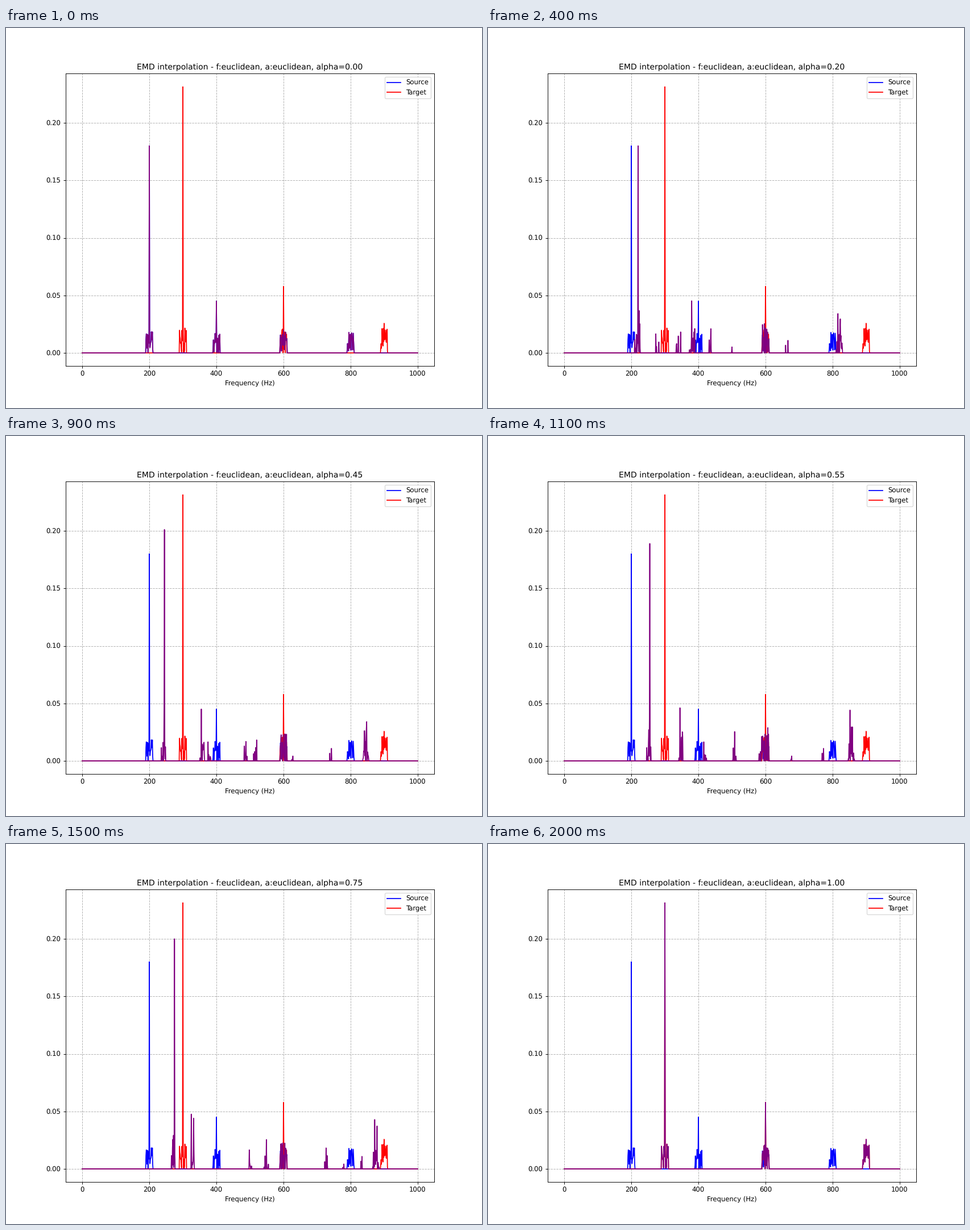
A matplotlib script for the animation above (2.1 s loop, 837x669 px).

```python
import matplotlib.pyplot as plt
import numpy as np
from matplotlib.animation import FuncAnimation

W, H, DPI = 837, 669, 83.7
STEPS = 20
N = 1001          # one bin per Hz
SPREAD = 10       # noise reaches this far around each harmonic
EPS = 1e-9

rng = np.random.default_rng(7)


def spectrum(base, count, peak):
    """Harmonics falling as 1/k^2 in narrow bands of noise, total mass 1."""
    spikes = 10 / np.arange(1, count + 1) ** 2
    bands = rng.random((count, 2 * SPREAD + 1))
    bands[:, SPREAD] = 0
    bands *= (10 / peak - spikes.sum()) / bands.sum()
    bands[:, SPREAD] = spikes
    y = np.zeros(N)
    for k, band in enumerate(bands, 1):
        y[k * base - SPREAD:k * base + SPREAD + 1] = band
    return y / y.sum()


def transport(start, end):
    """Send each bin to the cheapest open bin: (from, to, mass) parcels."""
    room = end.copy()
    bins = rng.permutation(np.flatnonzero(start))
    # Spikes choose first, the noise follows in random order.
    bins = bins[np.argsort(-np.maximum(start[bins], 0.03), kind="stable")]
    plan = []
    for i in bins:
        left = start[i]
        while left > EPS:
            free = np.flatnonzero(room > EPS)
            if not free.size:
                break
            cost = abs(free - i) + 1000 * abs(room[free] - left)
            j = free[cost.argmin()]
            m = min(left, room[j])
            left -= m
            room[j] -= m
            plan.append((i, j, m))
    return np.array(plan).T


freq = np.arange(N)
first = spectrum(200, 4, 0.18)
last = spectrum(300, 3, 0.2313)
src, dst, mass = transport(first, last)


def blend(alpha):
    pos = np.rint(src + alpha * (dst - src)).astype(int)
    return np.bincount(pos, weights=mass, minlength=N)


def heading(alpha):
    return f"EMD interpolation - f:euclidean, a:euclidean, alpha={alpha:.2f}"


plt.rcParams["font.family"] = "DejaVu Sans"
plt.rcParams["text.hinting"] = "none"
# The small margin keeps the pixel size from being truncated.
fig, ax = plt.subplots(figsize=((W + 0.01) / DPI, (H + 0.01) / DPI), dpi=DPI)
ax.plot(freq, first, color="blue", label="Source")
ax.plot(freq, last, color="red", label="Target")
mix, = ax.plot(freq, blend(0), color="purple")
ax.set_xlim(-50, 1050)
ax.set_ylim(-0.05 * last.max(), 1.05 * last.max())
ax.set_xlabel("Frequency (Hz)")
ax.grid(linestyle="--")
ax.legend(loc="upper right")
title = ax.set_title(heading(0))


def update(k):
    alpha = k / STEPS
    mix.set_ydata(blend(alpha))
    title.set_text(heading(alpha))
    return mix, title


anim = FuncAnimation(fig, update, frames=STEPS + 1, interval=100,
                     repeat=True, repeat_delay=0, blit=False)
plt.show()
```
